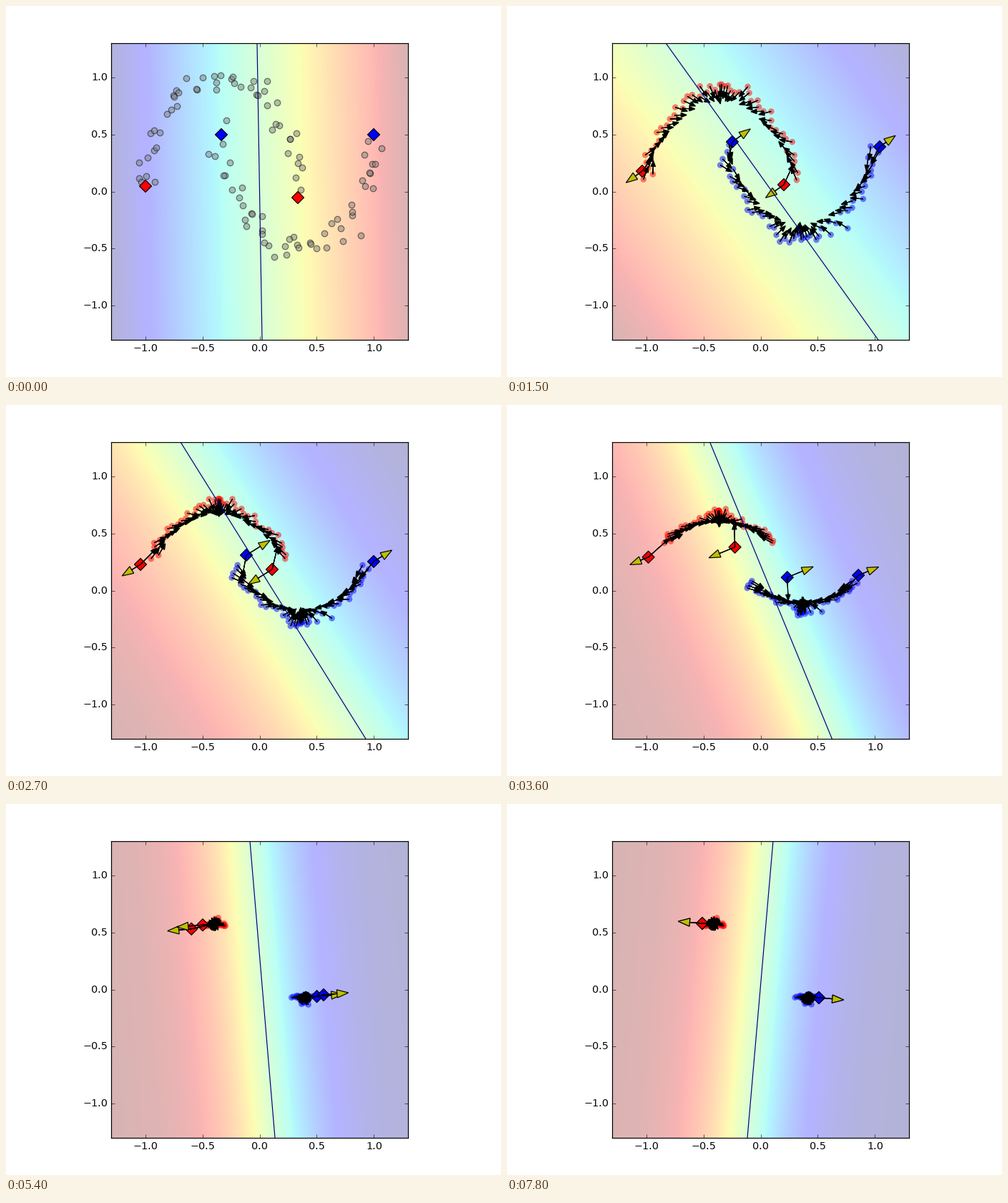
Write a matplotlib script that moves like this. It is 692 px wide and 519 px high and loops after 8000 ms.

```python
import numpy as np
import matplotlib.pyplot as plt
from matplotlib.animation import FuncAnimation
from matplotlib.collections import PolyCollection

plt.rcParams.update({
    "font.family": "DejaVu Sans", "font.size": 12, "axes.linewidth": 1.0,
    "text.hinting": "default", "ytick.alignment": "center",
    "xtick.direction": "in", "ytick.direction": "in",
    "xtick.top": True, "ytick.right": True,
    "xtick.major.size": 4, "ytick.major.size": 4,
    "xtick.major.width": 0.5, "ytick.major.width": 0.5,
    "xtick.major.pad": 4, "ytick.major.pad": 4,
})

LIMIT = 1.3
UNIT = 415.2 / (2 * LIMIT)                # pixels per data unit
ORIGIN = np.array([354.65, 259.5])
TWICE_CENTRE = np.array([709.3, 439.2])   # the two moons mirror through a point
STEPS, HOLD, INTERVAL, FRAMES = 27, 3, 100, 80
COLLAPSE = 18                             # step at which a moon is one clump
DOTS = 50

rng = np.random.RandomState(3)
ANGLES = np.linspace(0, np.pi, DOTS)
DRIFT = rng.normal(0, .06, (2, DOTS))
THICKNESS = rng.normal(0, 10, (2, DOTS))

# Labelled points: pixel paths through a few key steps.
LABEL_STEPS = [0, 5, 9, 14, 19]
LABEL_PATHS = [
    ([195, 189, 188, 204, 273], [252, 231, 223, 206, 167]),   # red, outer
    ([408, 387, 372, 283, 273], [268, 250, 230, 178, 167]),   # red, inner
    ([301, 315, 336, 429, 436], [180, 190, 210, 262, 271]),   # blue, inner
    ([514, 521, 514, 476, 436], [180, 197, 219, 251, 271]),   # blue, outer
]
LINE_STEPS = [1, 5, 9, 14, 18, 26]
LINE_TOP = [183, 222, 244, 310, 341, 372]
LINE_BOTTOM = [531, 519, 503, 422, 376, 336]


def to_data(pixels):
    return (pixels - ORIGIN) * (1, -1) / UNIT


def upper_moon(step, drift, thickness):
    """A half ellipse that flattens, gathers at its top and closes up."""
    t = min(step / COLLAPSE, 1)
    fold = np.cos(np.pi * t / 2) ** 2
    angle = ANGLES + drift * np.exp(-step / 2)
    c, s = np.cos(angle), np.sin(angle)
    gathered = np.sign(c) * np.abs(c) ** (1 + 3.8 * t ** 2)
    x = 301 - .4 * step - (10 + 96.5 * (1 - t ** 2.6)) * gathered
    y = 171 + 88.5 * fold - (6 + 154 * fold) * s
    width = thickness * (.35 + .65 * np.exp(-step / 5))
    return np.c_[x - width * c, y - width * s]


def both_moons(step):
    red, blue = (upper_moon(step, d, w) for d, w in zip(DRIFT, THICKNESS))
    return to_data(red), to_data(TWICE_CENTRE - blue)


def label_points(step):
    return to_data(np.array([[np.interp(step, LABEL_STEPS, axis) for axis in path]
                             for path in LABEL_PATHS]))


def decision_line(step):
    """Top x, bottom x and steepness of the classifier."""
    if step == 0:
        top, bottom, steep = 351, 358, -.2
    else:
        top = np.interp(step, LINE_STEPS, LINE_TOP)
        bottom = np.interp(step, LINE_STEPS, LINE_BOTTOM)
        steep = 3.6 * (1 - np.exp(-(step / 11) ** 2))
    return (top - ORIGIN[0]) / UNIT, (bottom - ORIGIN[0]) / UNIT, steep


def sigmoid(z):
    return 1 / (1 + np.exp(-z))


def mean_shift(points, crowd, reach):
    """Vector from each point to the weighted mean of its neighbours."""
    gap = crowd[None] - points[:, None]
    weight = np.exp(-(gap ** 2).sum(2) / (2 * reach ** 2))
    shift = (weight[..., None] * gap).sum(1) / weight.sum(1)[:, None]
    return shift, np.hypot(*shift.T)


def arrows(tails, directions, shafts, head_length, head_width):
    along = directions / (np.hypot(*directions.T)[:, None] + 1e-9)
    side = along[:, ::-1] * (-1, 1) * head_width / 2
    base = tails + along * shafts[:, None]
    tip = base + along * head_length
    return np.stack([tails, base, base + side, tip, base - side, base], axis=1)


fig = plt.figure(figsize=(8, 6), dpi=86.5, facecolor="white")
fig.subplots_adjust(left=.125, right=.9, bottom=.1, top=.9)
ax = fig.add_subplot(111)

grid = np.linspace(-LIMIT, LIMIT, 120)
GX, GY = np.meshgrid(grid, grid)
field = ax.imshow(GX, cmap="jet", alpha=.3, origin="lower", zorder=0,
                  interpolation="bilinear",
                  extent=(-LIMIT, LIMIT, -LIMIT, LIMIT))
dot_sets = [ax.scatter(*moon.T, s=50, alpha=.5, zorder=1)
            for moon in both_moons(0)]
diamonds = ax.scatter(*label_points(0).T, s=100, marker="D", linewidths=1,
                      c=["red", "red", "blue", "blue"], edgecolors="black",
                      zorder=1.1)


def arrow_layer(color, z):
    layer = PolyCollection([], facecolors=color, edgecolors="black",
                           linewidths=1, joinstyle="miter", zorder=z)
    return ax.add_collection(layer)


pulls = arrow_layer("black", 1.2)
pushes = arrow_layer((.75, .75, 0), 1.3)
boundary, = ax.plot([], [], color=(0, 0, .5), lw=1, zorder=2)

ax.set(xlim=(-LIMIT, LIMIT), ylim=(-LIMIT, LIMIT), aspect="equal",
       xticks=np.arange(-1, 1.1, .5), yticks=np.arange(-1, 1.1, .5))


def paint_dots(started):
    for dots, color in zip(dot_sets, ("red", "blue")):
        dots.set_facecolor(color if started else "gray")
        dots.set_edgecolor("none" if started else "black")
        dots.set_linewidth(0 if started else 1)


def update(frame):
    step = min(frame // HOLD, STEPS - 1)
    top, bottom, steep = decision_line(step)
    lean = top - bottom
    normal = np.array([-2 * LIMIT, lean]) / np.hypot(2 * LIMIT, lean)

    def score(x, y):
        edge = bottom + lean * (y + LIMIT) / (2 * LIMIT)
        return sigmoid(steep * (x - edge) * normal[0])

    values = score(GX, GY)
    field.set_data(values)
    field.set_clim(values.min(), values.max())
    boundary.set_data([bottom, top], [-LIMIT, LIMIT])

    labels, moons = label_points(step), both_moons(step)
    diamonds.set_offsets(labels)
    for dots, moon in zip(dot_sets, moons):
        dots.set_offsets(moon)
    paint_dots(step > 0)

    black, yellow = [], []
    if step:
        for moon, own, sign in zip(moons, (labels[:2], labels[2:]), (1, -1)):
            shift, size = mean_shift(moon, np.vstack([moon, own, own]), .32)
            black.extend(arrows(moon, shift, .08 * size / (size + .03), .05, .04))
            shift, size = mean_shift(own, moon, .2)
            black.extend(arrows(own, shift, .7 * size, .05, .04))
            p = score(*own.T)
            error = 1 - p if sign > 0 else p
            push = np.tile(sign * normal, (2, 1))
            shafts = .15 * np.tanh(2.2 * steep * error)
            yellow.extend(arrows(own, push, shafts, .1, .07))
    pulls.set_verts(black)
    pushes.set_verts(yellow)
    return [field, *dot_sets, diamonds, pulls, pushes, boundary]


anim = FuncAnimation(fig, update, frames=FRAMES, interval=INTERVAL,
                     init_func=lambda: update(0), repeat=True, repeat_delay=0,
                     blit=False)
plt.show()
```
